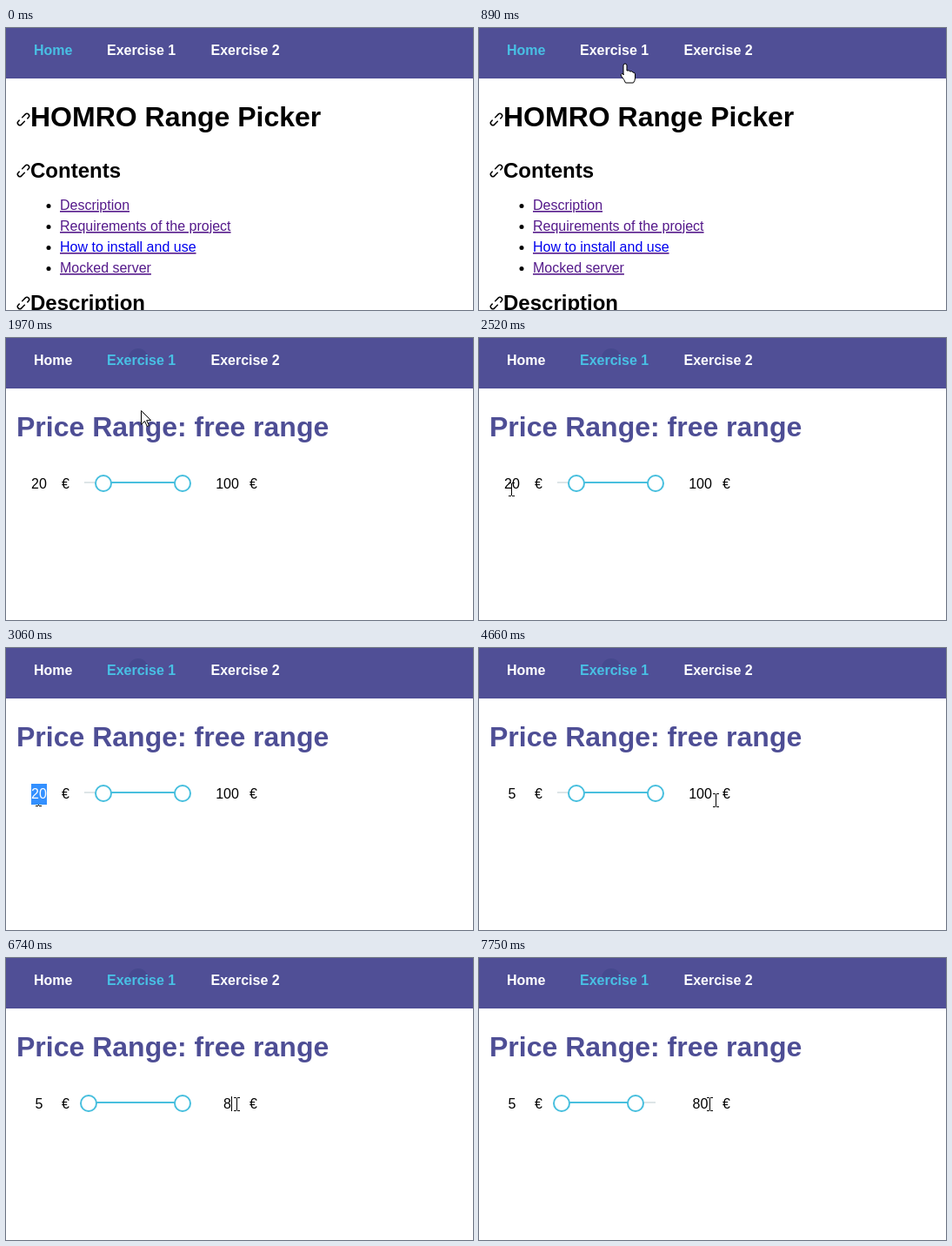
An HTML page that plays this animation: 537 px wide and 324 px high, repeating every 8000 ms.

```html
<!DOCTYPE html>
<html lang="en">
<head>
<meta charset="utf-8">
<title>Range picker demo</title>
<style>
  html, body { margin: 0; width: 537px; height: 324px; overflow: hidden; background: #fff; }
  svg { display: block; font: 16px "Liberation Sans", Arial, sans-serif; }
  .nav { font-weight: bold; fill: #fff; }
  .nav .on { fill: #48c0e4; }
  .h1 { font-size: 32px; font-weight: bold; }
  .h2 { font-size: 24px; font-weight: bold; }
  .links { fill: #551a8b; text-decoration: underline; }
  .mid { text-anchor: middle; }
  .knob { fill: #fff; stroke: #48bfde; stroke-width: 2; }
  .crisp { shape-rendering: crispEdges; }
</style>
</head>
<body>
<svg width="537" height="324" viewBox="0 0 537 324">
  <defs>
    <g id="chain" fill="none" stroke="#000" stroke-width="1.5" stroke-linecap="round">
      <path id="half" d="M-1.5-2.6H3.5a2.6 2.6 0 0 1 0 5.2H2" transform="rotate(-45) translate(2.2 0)"/>
      <use href="#half" transform="rotate(180)"/>
    </g>
  </defs>
  <rect width="537" height="58" fill="#504f96"/>
  <circle id="ripple" cx="152" cy="23" r="11" fill="#46498e"/>
  <path id="smudge" d="M141 23a11 11 0 0 1 22 0z" fill="#46498e"/>
  <g class="nav">
    <text id="home" x="32" y="31">Home</text>
    <text id="ex1" x="116" y="31">Exercise 1</text>
    <text x="235.500" y="31">Exercise 2</text>
  </g>

  <g id="intro">
    <use href="#chain" x="20" y="105"/>
    <text class="h1" x="28" y="113">HOMRO Range Picker</text>
    <use href="#chain" x="20" y="164"/>
    <text class="h2" x="28" y="172">Contents</text>
    <g class="links">
      <text x="62" y="209">Description</text>
      <text x="62" y="233">Requirements of the project</text>
      <text x="62" y="257" fill="#00e">How to install and use</text>
      <text x="62" y="281">Mocked server</text>
    </g>
    <circle cx="49" cy="204.500" r="2.500"/>
    <circle cx="49" cy="228.500" r="2.500"/>
    <circle cx="49" cy="252.500" r="2.500"/>
    <circle cx="49" cy="276.500" r="2.500"/>
    <use href="#chain" x="20" y="316"/>
    <text class="h2" x="28" y="324">Description</text>
  </g>

  <text id="loading" x="12" y="95" fill="#15152a">Loading...</text>

  <g id="picker">
    <text class="h1" x="12" y="113" fill="#4e4e95">Price Range: free range</text>
    <text x="64" y="173">€</text>
    <text x="280" y="173">€</text>
    <path class="crisp" d="M90 166H203" stroke="#dde5e7" stroke-width="2"/>
    <path class="crisp" id="span" stroke="#48bfde" stroke-width="2"/>
    <circle class="knob" id="low" cy="167" r="9"/>
    <circle class="knob" id="high" cy="167" r="9"/>
  </g>

  <g id="cursor">
    <path id="arrow" d="M.5.5v16l4-4 2.800 6 2.200-1-2.800-5.800h5z" fill="#fff" stroke="#000"/>
    <path id="hand" d="M-2 2q0-2 2-2t2 2v6q3-1 3.500 1 3-1 3.500 1 2.500 0 2.500 2v5q0 2-2 5h-9q-1-3-5-8-1-2 1-2.500t1.500 1.500z" fill="#fff" stroke="#000"/>
    <path id="beam" class="crisp" d="M-3.500-7.500h3m1 0h3M0-7V7M-3.500 7.500h3m1 0h3" fill="none" stroke="#000"/>
  </g>

  <g id="fields">
    <rect id="mark1" x="29" y="156" width="18" height="24" fill="#3390ff"/>
    <rect id="mark2" x="241" y="156" width="27" height="24" fill="#3390ff"/>
    <text class="mid" id="min" x="38" y="173"></text>
    <text class="mid" id="max" x="254.500" y="173"></text>
    <rect id="caret" y="159" width="1" height="17"/>
  </g>
</svg>
<script>
const LOOP = 8000, STEP = 70;
const $ = id => document.getElementById(id);
const show = (id, on) => $(id).setAttribute('display', on ? 'inline' : 'none');
const set = (id, name, value) => $(id).setAttribute(name, value);
const within = (v, a, b) => v >= a && v < b;

// Pointer path: time, x, y
const path = [
  [330, 394, 290], [540, 300, 180], [750, 195, 75], [960, 154, 24],
  [1630, 154, 24], [1970, 155, 83], [2110, 104, 145], [2250, 52, 173],
  [2380, 49, 173], [2520, 37.5, 173], [2850, 33.5, 174], [2920, 27.5, 175],
  [3060, 37.5, 173], [4380, 44, 176], [4520, 150, 185], [4660, 272, 174],
  [5000, 271, 164], [5270, 270, 164], [5410, 265, 167]
];
const holds = [960, 2250, 2520, 3060, 5000, 5410];

// Caret: from, to, x
const carets = [
  [2850, 2990, 38], [3920, 4450, 43], [4940, 5270, 43],
  [5270, 5480, 259], [6740, 7200, 259], [7200, 7750, 263]
];

function pointer(t) {
  const i = path.findLastIndex(p => p[0] <= t);
  const a = path[i], b = path[i + 1];
  if (!b || holds.includes(a[0])) return a.slice(1);
  const k = Math.floor((t - a[0]) / STEP) * STEP / (b[0] - a[0]);
  return [1, 2].map(n => a[n] + (b[n] - a[n]) * k);
}

function drawPointer(t) {
  show('cursor', t >= 330);
  if (t < 330) return;
  const [x, y] = pointer(t);
  const hand = y < 42 && within(x, 110, 200);
  const beam = t >= 1560 && within(y, 155, 182) && (within(x, 22, 58) || within(x, 236, 277));
  show('hand', hand);
  show('beam', beam);
  show('arrow', !hand && !beam);
  const snap = beam ? v => Math.floor(v) + .5 : Math.round;
  set('cursor', 'transform', `translate(${snap(x)} ${snap(y)})`);
}

function drawPicker(t) {
  const at = v => Math.round(89.4 + 1.136 * v);
  const low = at(t < 5270 ? 20 : 5), high = at(t < 7750 ? 100 : 80);
  set('low', 'cx', low);
  set('high', 'cx', high);
  set('span', 'd', `M${low} 166H${high}`);

  const marked1 = within(t, 2990, 3920), marked2 = within(t, 5480, 6740);
  show('mark1', marked1);
  show('mark2', marked2);
  set('min', 'fill', marked1 ? '#fff' : '#000');
  set('max', 'fill', marked2 ? '#fff' : '#000');
  $('min').textContent = t < 3920 ? '20' : '5';
  $('max').textContent = t < 6740 ? '100' : t < 7200 ? '8' : '80';

  const caret = carets.find(c => within(t, c[0], c[1]));
  show('caret', caret);
  if (caret) set('caret', 'x', caret[2]);
}

function frame(now) {
  const t = now % LOOP;
  show('intro', t < 1360);
  show('loading', within(t, 1360, 1560));
  show('picker', t >= 1560);
  show('fields', t >= 1560);
  show('ripple', within(t, 1290, 1560));
  show('smudge', t >= 1560);
  set('home', 'class', t < 1360 ? 'on' : '');
  set('ex1', 'class', t < 1360 ? '' : 'on');
  drawPointer(t);
  drawPicker(t);
  requestAnimationFrame(frame);
}
frame(0);
</script>
</body>
</html>
```
